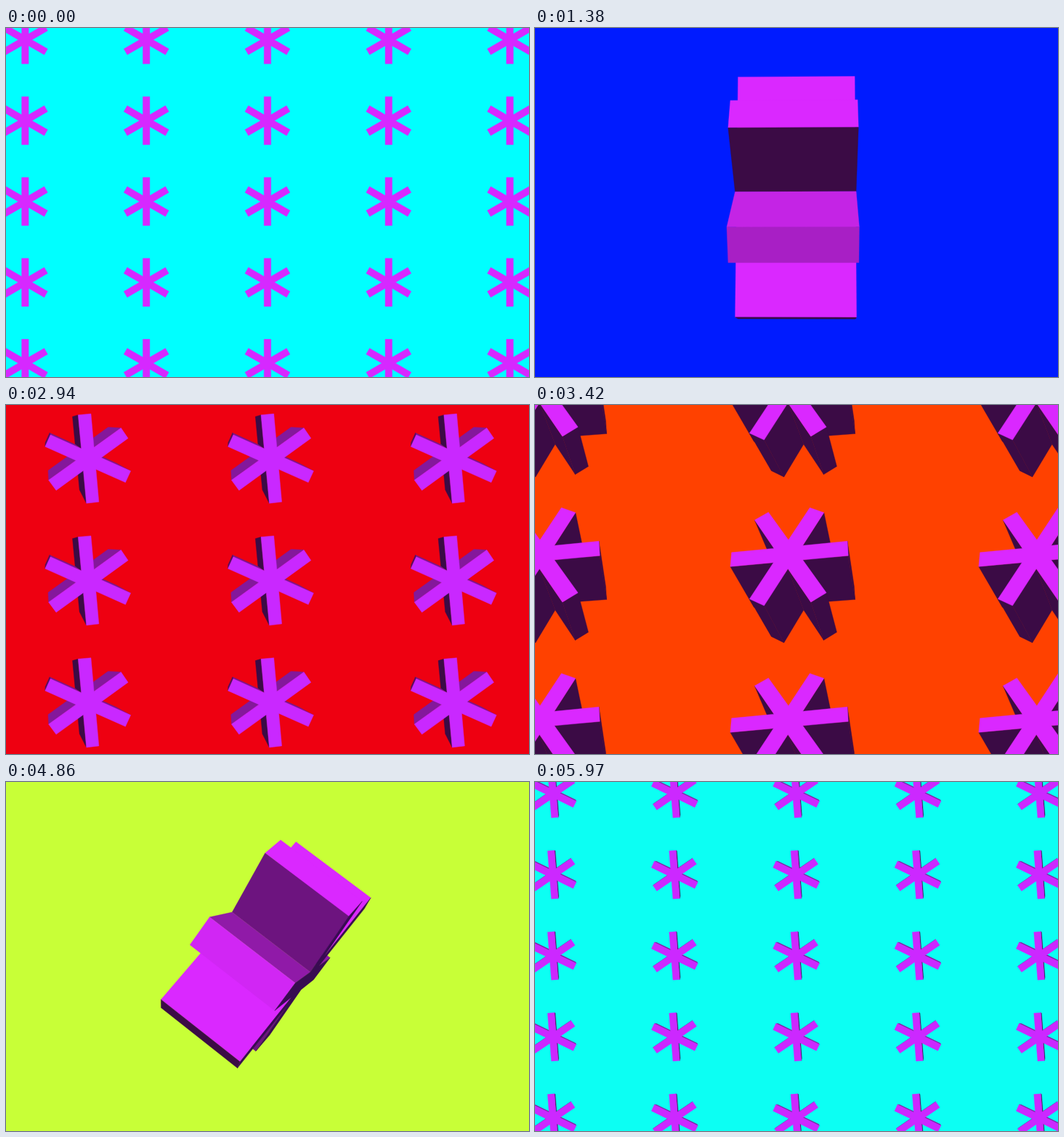
Recreate the animation shown at these times as an HTML page with a canvas. Size 720x480 px, loop 6000 ms.

```html
<!DOCTYPE html>
<html>
<head>
<meta charset="utf-8">
<style>
html, body { margin: 0; width: 100%; height: 100%; overflow: hidden; }
canvas { display: block; }
</style>
</head>
<body>
<canvas id="stage" width="720" height="480"></canvas>
<script>
const ctx = document.getElementById('stage').getContext('2d');
const W = 720, H = 480, LOOP = 6000, QUARTER = LOOP / 4, LAG = 40;
const REACH = 167, HALF = 24, EYE = 1400;
const LIGHT = [0, 0.57, 1.04], AMBIENT = 0.27;
const SIDE = [218, 40, 255], CAP = [206, 43, 300];
const CYAN = [0, 255, 255], BLUE = [0, 0, 255], RED = [255, 0, 0], YELLOW = [255, 255, 0];
const SKY = [CYAN, BLUE, RED, YELLOW, CYAN];

const dot = (a, b) => a[0] * b[0] + a[1] * b[1] + a[2] * b[2];
const mul = (a, s) => a.map(v => v * s);
const add = (a, b) => a.map((v, i) => v + b[i]);
const mix = (a, b, u) => a + (b - a) * u;
const ease = u => (1 - Math.cos(Math.PI * u)) / 2;

// The same angle about x, then y, then z: half a turn back to minus half a turn.
function orientation(t) {
  const angle = Math.PI * (1 - 2 * t / LOOP);
  const c = Math.cos(angle), s = Math.sin(angle);
  const spin = ([x, y, z]) => {
    [y, z] = [c * y - s * z, s * y + c * z];
    [x, z] = [c * x + s * z, c * z - s * x];
    return [c * x - s * y, s * x + c * y, z];
  };
  return [spin([0, 1, 0]), spin([-1, 0, 0]), spin([0, 0, 1])];
}

function skyColor(t) {
  const i = Math.floor(t / QUARTER), u = t / QUARTER - i;
  return `rgb(${SKY[i].map((v, j) => Math.round(mix(v, SKY[i + 1][j], u)))})`;
}

// Rises to the peak at a quarter, dips at the half, and mirrors back.
function zoom(t, start, peak, dip) {
  const q = Math.min(t, LOOP - t) / QUARTER;
  return q < 1 ? mix(start, peak, ease(q)) : mix(peak, dip, ease(q - 1));
}

// Visible faces as flat polygons, far to near.
function starFaces(m, depth, scale) {
  const h = depth / 2, faces = [];
  const world = v => add(add(mul(m[0], v[0]), mul(m[1], v[1])), mul(m[2], v[2]));
  const project = v => {
    const p = world(v), s = scale * EYE / (EYE - p[2]);
    return [p[0] * s, -p[1] * s];
  };
  function face(points, normal, base) {
    const n = world(normal), p = world(points[0]);
    if (dot(n, [-p[0], -p[1], EYE - p[2]]) <= 0) return;
    const glow = Math.max(AMBIENT, dot(n, LIGHT));
    const rgb = base.map((c, i) => Math.min(SIDE[i], Math.round(c * glow)));
    faces.push({ points: points.map(project), color: `rgb(${rgb})` });
  }

  const arms = [], outline = [];
  for (let i = 0; i < 6; i++) {
    const c = Math.cos(i * Math.PI / 3), s = Math.sin(i * Math.PI / 3);
    const at = (x, y) => [c * x - s * y, s * x + c * y];
    const root = HALF * Math.sqrt(3);
    const ring = [at(root, -HALF), at(REACH, -HALF), at(REACH, HALF), at(root, HALF)];
    const normals = [at(0, -1), at(1, 0), at(0, 1)];
    outline.push(...ring.slice(0, 3));
    arms.push({ ring, normals, near: c * m[0][2] + s * m[1][2] });
  }
  arms.sort((p, q) => p.near - q.near);
  for (const { ring, normals } of arms) {
    normals.forEach((n, j) => {
      const p = ring[j], q = ring[j + 1];
      face([[...p, -h], [...q, -h], [...q, h], [...p, h]], [...n, 0], SIDE);
    });
  }
  for (const z of [-1, 1]) face(outline.map(p => [...p, z * h]), [0, 0, z], CAP);
  return faces;
}

function drawStar(faces, x, y) {
  for (const { points, color } of faces) {
    ctx.beginPath();
    for (const [px, py] of points) ctx.lineTo(x + px, y + py);
    ctx.closePath();
    ctx.fillStyle = ctx.strokeStyle = color;
    ctx.fill();
    ctx.stroke();
  }
}

function draw(t) {
  const late = Math.max(0, t - LAG);
  const scale = zoom(t, 0.1917, 1, 0.33);
  const pitch = zoom(t, 0.2317, 1.05, 0.347);
  const depth = 178 - 90 * Math.cos(2 * Math.PI * late / LOOP);
  const faces = starFaces(orientation(late), depth, scale);
  ctx.fillStyle = skyColor(late);
  ctx.fillRect(0, 0, W, H);
  ctx.lineWidth = 0.4;
  ctx.lineJoin = 'round';
  for (let row = -3; row <= 3; row++) {
    for (let col = -3; col <= 3; col++) {
      drawStar(faces, W / 2 + col * W * pitch, H / 2 - 7 * scale + row * H * pitch);
    }
  }
}

const start = performance.now();
function tick() {
  draw((performance.now() - start) % LOOP);
  requestAnimationFrame(tick);
}
tick();
</script>
</body>
</html>
```
